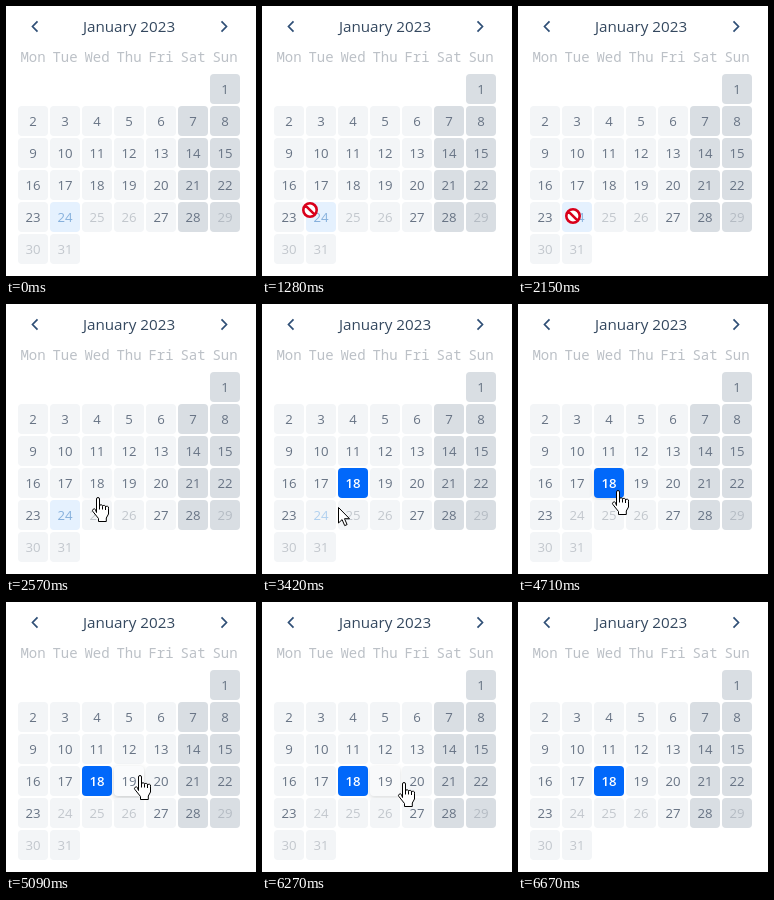
These frames come from a looping animation (250 px wide and 270 px high, 6970 ms). An HTML page with a canvas:

```html
<!DOCTYPE html>
<html lang="en">
<head>
<meta charset="utf-8">
<title>Calendar</title>
<style>
html, body { margin: 0; width: 100%; height: 100%; overflow: hidden; background: #fff; }
canvas { display: block; width: 250px; height: 270px; }
</style>
</head>
<body>
<canvas id="stage" width="250" height="270"></canvas>
<script>
const ctx = document.getElementById('stage').getContext('2d');
const LOOP = 6970;
const SANS = '"Open Sans", "Noto Sans", sans-serif';
const MONO = '"Noto Sans Mono", "DejaVu Sans Mono", monospace';
const PITCH = 32, CELL = 30, LEFT = 12, TOP = 68;
const DISABLED = [24, 25, 26, 29, 30, 31];
const TODAY = 24, PICKED = 18;
const PICK_TIME = 2930, ENTER = 1030, LEAVE = 6670;

const PLAIN = [243, 245, 247], WEEKEND = [217, 222, 227], WHITE = [255, 255, 255];
const HOVER = [250, 251, 252], PALE_BLUE = [229, 241, 254], BLUE = [1, 104, 250];
const INK = [103, 115, 132];

// start, end, steps, x, y, ease-out power
const MOVES = [
  [1030, 1280, 9, 48, 204, 1.5],
  [1480, 1550, 3, 53, 209, 1],
  [2150, 2180, 2, 56, 210, 1],
  [2380, 2730, 10, 100, 189, 2.5],
  [3330, 3610, 9, 62, 211, 2.5],
  [4050, 4051, 1, 60, 211, 1],
  [4520, 4770, 9, 101, 185, 2.5],
  [4940, 5090, 6, 134, 173, 2.5],
  [5900, 5901, 1, 135, 173, 1],
  [6270, 6670, 14, 226, 275, 1]
];
const CLICKS = [[2930, 3000], [3750, 3850], [4150, 4260]];

const HAND = new Path2D('M5.5 15.5V2a1.5 1.5 0 0 1 3 0V9a1.5 1.5 0 0 1 3 .5a1.5 1.5 0 0 1 3 .8a1.5 1.5 0 0 1 3 .9V17l-2.2 4v3.5H7.5v-3l-5.6-7a1.6 1.6 0 0 1 2.5-2z');
const FINGERS = new Path2D('M8.5 9v3.5M11.5 9.5v3M14.5 10v3');
const ARROW = new Path2D('M.5 .5V16l3.6-3.4 2.6 6 2.4-1-2.6-5.9H11.5z');

const clamp = v => Math.max(0, Math.min(1, v));
const ramp = (t, a, b) => clamp((t - a) / (b - a));
const blend = (a, b, p) => a.map((v, i) => Math.round(v + (b[i] - v) * p));
const rgb = c => `rgb(${c})`;

function pointer(t) {
  if (t < ENTER || t >= LEAVE) return null;
  let x = 128, y = 262;
  for (const [a, b, n, toX, toY, pow] of MOVES) {
    if (t < a) break;
    const step = Math.floor(ramp(t, a, b) * (n - 1)) + 1;
    // the first move begins on its entry point
    const p = a === ENTER ? (step - 1) / (n - 1) : step / n;
    const e = 1 - (1 - p) ** pow;
    x += (toX - x) * e;
    y += (toY - y) * e;
  }
  return { x, y };
}

function dayAt(pos) {
  if (!pos) return 0;
  const dx = pos.x - LEFT, dy = pos.y - TOP;
  if (dx < 0 || dy < 0 || dx % PITCH > CELL || dy % PITCH > CELL) return 0;
  const col = Math.floor(dx / PITCH), row = Math.floor(dy / PITCH);
  const day = row * 7 + col - 5;
  return col < 7 && day > 0 && day < 32 ? day : 0;
}

// fraction of the last 100 ms spent over a day, as a stateless transition
function hoverOf(day, t) {
  let hits = 0;
  for (let i = 0; i < 6; i++) if (dayAt(pointer(t - i * 20)) === day) hits++;
  return (hits / 6) ** 2;
}

function text(str, x, y, font, color) {
  ctx.font = font;
  ctx.fillStyle = color;
  ctx.textAlign = 'center';
  ctx.fillText(str, x, y);
}

function box(x, y, color, lift) {
  ctx.save();
  ctx.shadowColor = `rgba(40, 50, 60, ${0.25 * lift})`;
  ctx.shadowBlur = 5;
  ctx.shadowOffsetY = 2;
  ctx.fillStyle = color;
  ctx.beginPath();
  ctx.roundRect(x, y, CELL, CELL, 4);
  ctx.fill();
  ctx.restore();
}

function drawDay(day, t) {
  const col = (day + 5) % 7, row = Math.floor((day + 5) / 7);
  const x = LEFT + col * PITCH, y = TOP + row * PITCH;
  const off = DISABLED.includes(day), weekend = col > 4;
  const hover = off ? 0 : hoverOf(day, t);
  const picked = day === PICKED ? ramp(t, PICK_TIME, PICK_TIME + 90) : 0;
  let fill = blend(weekend ? WEEKEND : PLAIN, HOVER, hover);
  let ink = off ? (weekend ? '#b4bbc3' : '#c2c7cd') : rgb(blend(INK, WHITE, picked));

  if (day === TODAY) {
    fill = blend(PALE_BLUE, PLAIN, ramp(t, PICK_TIME, 3070));
    if (t < 4520) ink = t < PICK_TIME ? '#86b0dc' : '#b0d0ef';
  }
  fill = blend(fill, BLUE, picked);
  box(x, y, rgb(fill), hover);
  const weight = picked > .5 ? 600 : 400;
  text(day, x + 15, y + 20, `${weight} 13.2px ${SANS}`, ink);
}

function chevron(x, dir) {
  ctx.strokeStyle = '#2f4f76';
  ctx.lineWidth = 1.7;
  ctx.beginPath();
  ctx.moveTo(x - 2.5 * dir, 15.3);
  ctx.lineTo(x + 2.5 * dir, 20.5);
  ctx.lineTo(x - 2.5 * dir, 25.7);
  ctx.stroke();
}

function outline(path) {
  ctx.fillStyle = '#fff';
  ctx.strokeStyle = '#000';
  ctx.lineWidth = 1;
  ctx.fill(path);
  ctx.stroke(path);
}

function noEntry() {
  ctx.fillStyle = '#fff';
  ctx.strokeStyle = '#d9001b';
  ctx.lineWidth = 2.6;
  ctx.beginPath();
  ctx.arc(0, 0, 6.7, 0, Math.PI * 2);
  ctx.fill();
  ctx.moveTo(-4.7, -4.7);
  ctx.lineTo(4.7, 4.7);
  ctx.stroke();
}

function drawPointer(t) {
  const pos = pointer(t);
  if (!pos) return;
  const day = dayAt(pos);
  ctx.save();
  ctx.translate(Math.round(pos.x), Math.round(pos.y));
  if (CLICKS.some(([a, b]) => t >= a && t < b)) {
    ctx.fillStyle = 'rgba(255, 0, 0, .25)';
    ctx.beginPath();
    ctx.arc(0, 0, 12, 0, Math.PI * 2);
    ctx.fill();
  }
  if (!day) {
    outline(ARROW);
  } else if (DISABLED.includes(day)) {
    noEntry();
  } else {
    ctx.translate(-7, 0);
    outline(HAND);
    ctx.stroke(FINGERS);
  }
  ctx.restore();
}

function draw(t) {
  ctx.fillStyle = '#fff';
  ctx.fillRect(0, 0, 250, 270);
  chevron(29, -1);
  chevron(218, 1);
  text('January 2023', 123, 26, `15.2px ${SANS}`, '#34485f');
  ['Mon', 'Tue', 'Wed', 'Thu', 'Fri', 'Sat', 'Sun'].forEach((name, i) =>
    text(name, 27 + i * PITCH, 56, `300 14px ${MONO}`, '#bcc1c7'));
  for (let day = 1; day < 32; day++) drawDay(day, t);
  drawPointer(t);
}

const start = performance.now();
function tick() {
  draw((performance.now() - start) % LOOP);
  requestAnimationFrame(tick);
}
tick();
</script>
</body>
</html>
```
